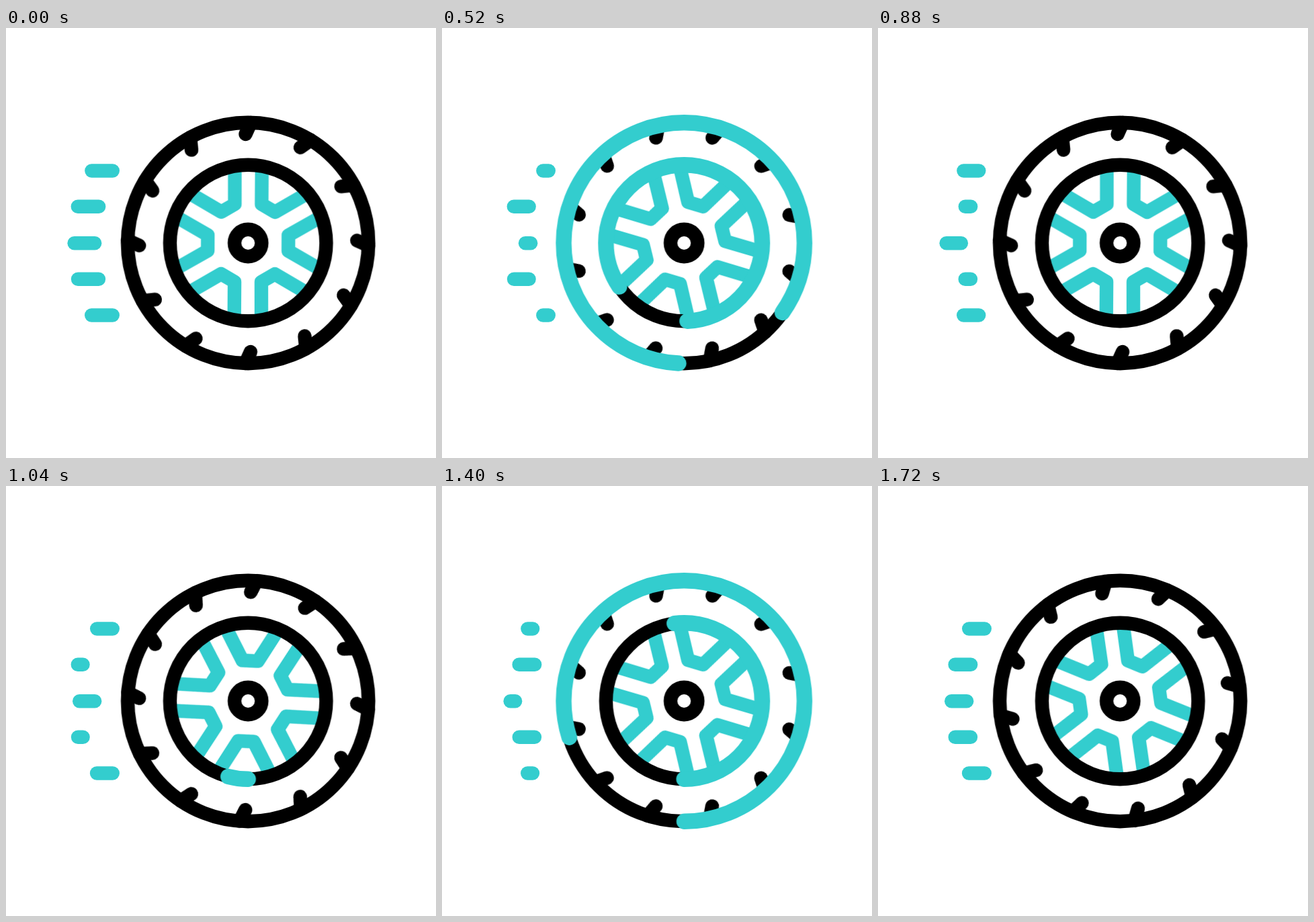
Animation of 640 by 640 pixels, one loop 1.76 s. Source, as an HTML page without scripts:

```html
<!DOCTYPE html>
<html lang="en">
<head>
<meta charset="utf-8">
<title>Rolling wheel</title>
<style>
/* --from / --to: visible part of a ring sweep, in degrees from the bottom */
@property --from { syntax: "<number>"; inherits: false; initial-value: 0; }
@property --to { syntax: "<number>"; inherits: false; initial-value: 0; }
/* --beat: even = dash full, odd = dash gone; --lag: how far the second group trails */
@property --beat { syntax: "<number>"; inherits: true; initial-value: 0; }
@property --lag { syntax: "<number>"; inherits: true; initial-value: 1; }

html, body { margin: 0; width: 100%; height: 100%; overflow: hidden; background: #fff; }
svg {
  --ease: cubic-bezier(.3333, 0, .6667, 1);
  --teal: #33cdce;
  display: block; width: 100%; height: 100%;
  fill: none; stroke: #000; stroke-width: 20.4;
  stroke-linejoin: round;
  animation: beat 1760ms var(--ease) infinite, lag 1760ms var(--ease) infinite;
}
.teal { stroke: var(--teal); }
.round { stroke-linecap: round; }
.spin { animation: spin 1760ms linear infinite; }

.sweep {
  stroke-width: 23.4;
  stroke-dasharray: calc((var(--to) - var(--from)) * 1px) 999px;
  stroke-dashoffset: calc(var(--from) * -1px);
  opacity: calc((var(--to) - var(--from)) * 99);
  animation: to 1760ms var(--ease) infinite, from 1760ms var(--ease) infinite;
}
.late { animation-delay: 67ms; }

.dash {
  --trail: 0;
  stroke-dasharray: 360px 362px;
  stroke-dashoffset: calc(max(0, var(--beat) - var(--trail)) * -361px);
}
.second { --trail: var(--lag); }

@keyframes spin { to { transform: rotate(360deg); } }
@keyframes to {
  0%, 11.364% { --to: 0; }
  30.51%, 50% { --to: 360; }
  50.01%, 56.818% { --to: 0; }
  75.97%, 100% { --to: 360; }
}
@keyframes from {
  0%, 24.83% { --from: 0; }
  43.98%, 50% { --from: 360; }
  50.01%, 70.28% { --from: 0; }
  89.43%, 100% { --from: 360; }
}
@keyframes beat {
  0%, 6.818% { --beat: 0; }
  13.636% { --beat: 1; }
  20.455% { --beat: 2; }
  27.273% { --beat: 3; }
  34.091% { --beat: 4; }
  40.909% { --beat: 5; }
  47.727% { --beat: 6; }
  54.545% { --beat: 7; }
  61.364% { --beat: 8; }
  68.182% { --beat: 9; }
  75% { --beat: 10; }
  81.818%, 93.182% { --beat: 11; }
  100% { --beat: 12; }
}
@keyframes lag {
  0%, 81.818% { --lag: 1; }
  88.636%, 100% { --lag: 0; }
}
</style>
</head>
<body>
<svg viewBox="0 0 640 640">
  <defs>
    <path id="spoke" d="M-107-38.5L-60-11.6V11.6L-107 38.5"/>
    <g id="spokes">
      <use href="#spoke"/>
      <use href="#spoke" transform="rotate(60)"/>
      <use href="#spoke" transform="rotate(120)"/>
    </g>
    <path id="tread" d="M-4.3-162L3.3-179"/>
    <g id="treads">
      <use href="#tread"/>
      <use href="#tread" transform="rotate(30)"/>
      <use href="#tread" transform="rotate(60)"/>
    </g>
  </defs>

  <g class="teal round">
    <path class="dash" pathLength="360" d="M158.8 212.5H127.4"/>
    <path class="dash second" pathLength="360" d="M138.2 265.8H106.8"/>
    <path class="dash" pathLength="360" d="M132.2 320.2H101.6"/>
    <path class="dash second" pathLength="360" d="M138 373.7H107"/>
    <path class="dash" pathLength="360" d="M158.8 427.5H127.2"/>
  </g>

  <g transform="translate(360.3 320)">
    <g class="spin">
      <g class="teal">
        <use href="#spokes"/>
        <use href="#spokes" transform="rotate(180)"/>
      </g>
      <g class="round">
        <use href="#treads"/>
        <use href="#treads" transform="rotate(90)"/>
        <use href="#treads" transform="rotate(180)"/>
        <use href="#treads" transform="rotate(270)"/>
      </g>
    </g>
    <circle r="179.2"/>
    <circle r="116.3"/>
    <circle r="20.2"/>
    <g class="teal round">
      <path class="sweep late" pathLength="360" d="M0 179.2A179.2 179.2 0 0 1 0-179.2A179.2 179.2 0 0 1 0 179.2"/>
      <path class="sweep" pathLength="360" d="M0 116.3A116.3 116.3 0 0 1 0-116.3A116.3 116.3 0 0 1 0 116.3"/>
    </g>
  </g>
</svg>
</body>
</html>
```
